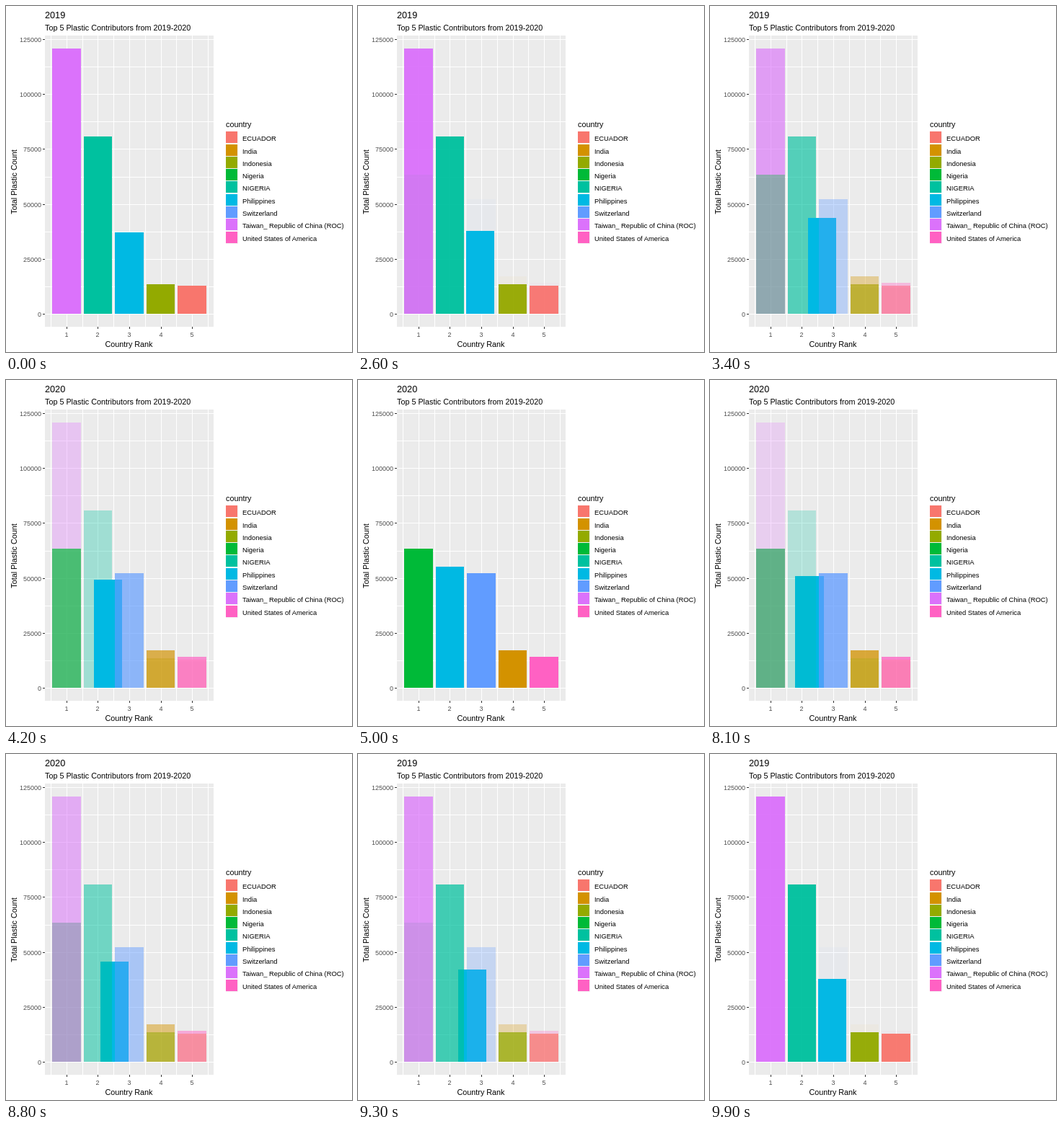
Animation, 480 px wide and 480 px high, one loop 10000 ms. Source, as an HTML page:

```html
<!DOCTYPE html>
<html lang="en">
<head>
<meta charset="utf-8">
<title>Top 5 Plastic Contributors</title>
<style>
html, body { margin: 0; width: 100%; height: 100%; overflow: hidden; background: #fff; }
svg { display: block; width: 100vw; height: 100vh; font-family: "Liberation Sans", Arial, sans-serif; }
rect { shape-rendering: crispEdges; }
</style>
</head>
<body>
<svg viewBox="0 0 480 480">
  <g id="frame"></g>
  <g id="bars"></g>
  <text id="year" x="54" y="17" font-size="12.7"></text>
</svg>
<script>
const HALF = 5000, STEP = 100, HOLD = 25, TWEEN = 25;
const BASE = 427.5, UNIT = 0.003048, X1 = 84.46, PITCH = 43.52, BAR = 0.45 * PITCH;
const TITLE = 10.8, TICK = 9, LABEL = 9.4;

const colors = {
  'ECUADOR': '#F8766D',
  'India': '#D39200',
  'Indonesia': '#93AA00',
  'Nigeria': '#00BA38',
  'NIGERIA': '#00C19F',
  'Philippines': '#00B9E3',
  'Switzerland': '#619CFF',
  'Taiwan_ Republic of China (ROC)': '#DB72FB',
  'United States of America': '#FF61C3'
};

// [country, rank, count]
const years = [
  { name: '2019', rows: [
    ['Taiwan_ Republic of China (ROC)', 1, 120700], ['NIGERIA', 2, 80700],
    ['Indonesia', 4, 13450], ['ECUADOR', 5, 12800]] },
  { name: '2020', rows: [
    ['Nigeria', 1, 63300], ['Switzerland', 3, 52200],
    ['India', 4, 17050], ['United States of America', 5, 14100]] }
];
const stayer = [['Philippines', 3, 37100], ['Philippines', 2, 55150]];

const byId = id => document.getElementById(id);
const xPos = rank => X1 + (rank - 1) * PITCH;
const yPos = count => Math.floor(BASE - count * UNIT);

function rect(x, y, w, h, fill, alpha = 1) {
  return `<rect x="${x}" y="${y}" width="${w}" height="${h}" fill="${fill}" fill-opacity="${alpha}"/>`;
}

function text(x, y, str, size, attrs = '') {
  return `<text x="${x}" y="${y}" font-size="${size}" ${attrs}>${str}</text>`;
}

function bar([country, rank, count], alpha = 1) {
  const left = Math.floor(xPos(rank) - BAR);
  const right = Math.floor(xPos(rank) + BAR);
  const top = yPos(count);
  return rect(left, top, right - left, yPos(0) - top, colors[country], alpha);
}

function drawFrame() {
  let out = rect(54, 41, 234, 404, '#EBEBEB');
  for (let v = 0; v <= 125000; v += 12500) {
    const y = yPos(v);
    out += rect(54, y, 234, 1, '#fff');
    if (v % 25000) continue;
    out += rect(51, y, 3, 1, '#333');
    out += text(49, y + 4, v, TICK, 'text-anchor="end" fill="#4D4D4D"');
  }
  for (let r = 0.5; r <= 5.5; r += 0.5) {
    const x = Math.floor(xPos(r));
    out += rect(x, 41, 1, 404, '#fff');
    if (r % 1) continue;
    out += rect(x, 445, 1, 3, '#333');
    out += text(x, 459, r, TICK, 'text-anchor="middle" fill="#4D4D4D"');
  }
  out += text(54, 34, 'Top 5 Plastic Contributors from 2019-2020', TITLE);
  out += text(170.5, 473, 'Country Rank', TITLE, 'text-anchor="middle"');
  out += text(0, 0, 'Total Plastic Count', TITLE,
    'text-anchor="middle" transform="translate(15 244) rotate(-90)"');
  out += text(305, 168, 'country', TITLE);
  Object.entries(colors).forEach(([name, fill], i) => {
    const y = Math.floor(174.8 + i * 17.28);
    out += rect(305, y, 17, 17, '#F2F2F2') + rect(305, y, 16, 16, fill);
    out += text(328, y + 13, name, LABEL);
  });
  byId('frame').innerHTML = out;
}

function render(ms) {
  const t = ms % (2 * HALF);
  const from = t < HALF ? 0 : 1, to = 1 - from;
  const step = Math.max(0, Math.floor((t % HALF) / STEP) - HOLD);
  const p = step / TWEEN;

  const leaving = years[from].rows.map(r => bar(r, 1 - p)).join('');
  const entering = step ? years[to].rows.map(r => bar(r, p)).join('') : '';
  const [, r0, c0] = stayer[from], [name, r1, c1] = stayer[to];
  const moving = bar([name, r0 + (r1 - r0) * p, c0 + (c1 - c0) * p]);

  byId('bars').innerHTML = (from ? moving + leaving : leaving + moving) + entering;
  byId('year').textContent = years[step > 13 ? to : from].name;
}

drawFrame();
render(0);
let start;
requestAnimationFrame(function tick(now) {
  start ??= now;
  render(now - start);
  requestAnimationFrame(tick);
});
</script>
</body>
</html>
```
